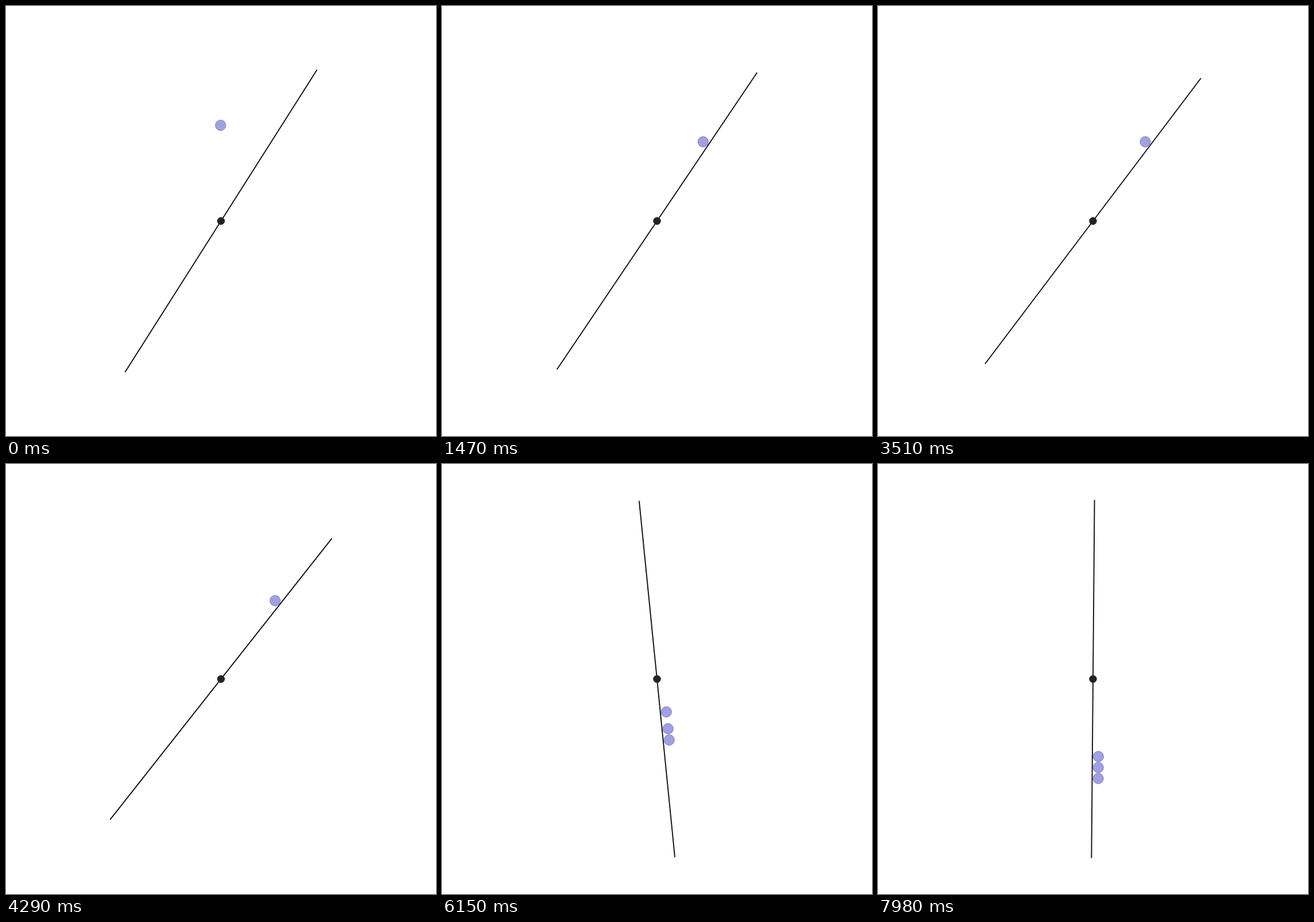
An HTML page with a canvas that plays this animation: 748x748 px, repeating every 8000 ms.

```html
<!DOCTYPE html>
<html lang="en">
<head>
<meta charset="utf-8">
<title>Balls on a pivoting rod</title>
<style>
html, body { margin: 0; width: 100%; height: 100%; overflow: hidden; background: #fff; }
canvas { display: block; }
</style>
</head>
<body>
<canvas id="stage" width="748" height="748"></canvas>
<script>
const ctx = document.getElementById('stage').getContext('2d');
const LOOP = 8000, STEP = 30, CUT = 4.5;
const CENTER = 374, HALF = 311.5;
const DRAG = 0.907;   // per second, slows sliding along the rod
const CONTACT = 10.5; // ball centre to rod
const BALL = 9.2;

// Sliding distance runs to `rest`; `gap` is how far it still has to go at t = 0.
const slide = (rest, gap, t) => rest - gap * Math.exp(-DRAG * t);

// Distance to the rod: steady approach, then contact.
function approach(from, start, hit, t) {
  const p = Math.min(1, (t - start) / (hit - start));
  return from + (CONTACT - from) * p;
}

// Each scene gives the rod angle in degrees and balls as [along, across].
function firstScene(t) {
  const hit = 0.44;
  return {
    angle: 32.41 + 1.52 * Math.max(0, t - hit),
    balls: [[slide(165.8, 25.6, t), -approach(89.8, 0, hit, t)]]
  };
}

function secondScene(t) {
  const s = Math.max(0, t - 5.38);
  const turn = 4.85 * (s - (1 - Math.exp(-0.76 * s)) / 0.76);
  const late = t - 6.15;
  const low = slide(188.3, 80.7, late);
  const mid = Math.min(slide(169.3, 81.3, late), low - 19);
  const top = Math.min(slide(156, 97.4, late), mid - 19);
  return {
    angle: -6.63 + turn,
    balls: [
      [-top, approach(322, CUT, 5.7, t)],
      [-mid, approach(280, CUT, 5.55, t)],
      [-low, approach(255, CUT, 5.4, t)]
    ]
  };
}

function disc(x, y, r, fill, edge) {
  ctx.beginPath();
  ctx.arc(x, y, r, 0, Math.PI * 2);
  ctx.fillStyle = fill;
  ctx.fill();
  ctx.strokeStyle = edge;
  ctx.lineWidth = 1;
  ctx.stroke();
}

function draw(t) {
  const { angle, balls } = t < CUT ? firstScene(t) : secondScene(t);
  const a = angle * Math.PI / 180, sin = Math.sin(a), cos = Math.cos(a);
  const place = (along, across) => [
    CENTER + along * sin + across * cos,
    CENTER - along * cos + across * sin
  ];
  ctx.fillStyle = '#fff';
  ctx.fillRect(0, 0, 748, 748);

  for (const [along, across] of balls) {
    disc(...place(along, across), BALL, '#a09fe0', '#8584c4');
  }

  ctx.beginPath();
  ctx.moveTo(...place(-HALF, 0));
  ctx.lineTo(...place(HALF, 0));
  ctx.strokeStyle = '#111';
  ctx.lineWidth = 1.9;
  ctx.stroke();

  disc(CENTER, CENTER, 6.3, '#222', '#333');
}

function tick() {
  const ms = performance.now() % LOOP;
  draw(Math.floor(ms / STEP) * STEP / 1000);
  requestAnimationFrame(tick);
}
tick();
</script>
</body>
</html>
```
